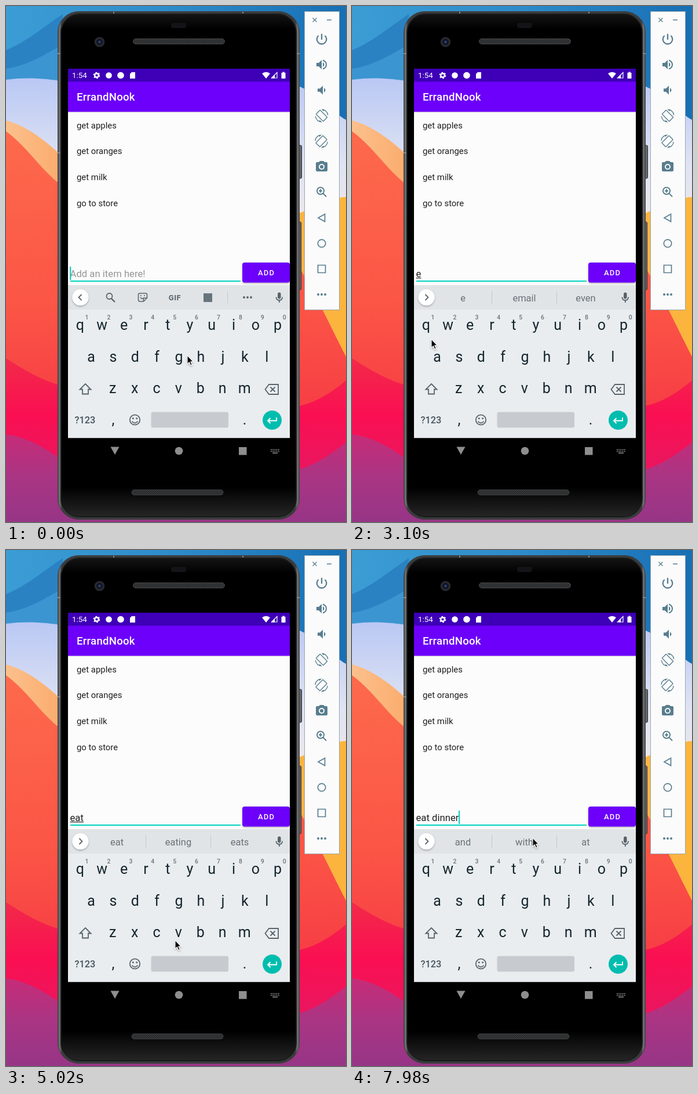
Recreate the animation shown at these times as an HTML page. Size 587x889 px, loop 8000 ms.

```html
<!DOCTYPE html>
<html lang="en">
<head>
<meta charset="utf-8">
<title>To-do list demo</title>
<style>
html, body { margin: 0; width: 100%; height: 100%; overflow: hidden; background: #000; }
svg { display: block; width: 587px; height: 889px; font-family: Roboto, sans-serif; }
text { white-space: pre; }
.mid { text-anchor: middle; }
.key { font-size: 25px; fill: #14252c; text-anchor: middle; }
.num { font-size: 10.5px; fill: #69747a; text-anchor: middle; font-weight: 500; }
.item { font-size: 14.9px; fill: #202020; }
.sug { font-size: 16.5px; fill: #697177; text-anchor: middle; }
.line { fill: none; stroke: #58636a; stroke-width: 1.8; }
.tool { fill: none; stroke: #587d8e; stroke-width: 2; }
.solid { fill: #587d8e; stroke: none; }
</style>
</head>
<body>
<svg id="stage" viewBox="0 0 587 889" xmlns="http://www.w3.org/2000/svg">
<defs>
  <linearGradient id="sky" x1="0" y1="0" x2="1" y2="0"><stop offset="0" stop-color="#3c9dd5"/><stop offset=".5" stop-color="#2d8bca"/><stop offset="1" stop-color="#176fb4"/></linearGradient>
  <linearGradient id="mist" x1="0" y1="0" x2="0" y2="1"><stop offset="0" stop-color="#b9c8f4"/><stop offset=".5" stop-color="#dfe3f3"/><stop offset="1" stop-color="#f3eae6"/></linearGradient>
  <linearGradient id="peach" x1="0" y1="0" x2="1" y2="0"><stop offset="0" stop-color="#fbc08c"/><stop offset=".2" stop-color="#fba765"/><stop offset="1" stop-color="#fbb53c"/></linearGradient>
  <linearGradient id="coral" x1="0" y1="0" x2="0" y2="1"><stop offset="0" stop-color="#fd6a4c"/><stop offset=".6" stop-color="#fb5546"/><stop offset="1" stop-color="#f63a44"/></linearGradient>
  <linearGradient id="rose" x1="0" y1="0" x2="0" y2="1"><stop offset="0" stop-color="#f22a49"/><stop offset=".35" stop-color="#fa0f52"/><stop offset="1" stop-color="#d91d6c"/></linearGradient>
  <linearGradient id="plum" x1="0" y1="0" x2="0" y2="1"><stop offset="0" stop-color="#c62c78"/><stop offset=".5" stop-color="#a93584"/><stop offset="1" stop-color="#973586"/></linearGradient>
  <linearGradient id="rim" x1="0" y1="0" x2="1" y2="0"><stop offset="0" stop-color="#4c4d4e"/><stop offset=".008" stop-color="#727374"/><stop offset=".016" stop-color="#3a3b3c"/><stop offset=".984" stop-color="#3a3b3c"/><stop offset=".992" stop-color="#727374"/><stop offset="1" stop-color="#4c4d4e"/></linearGradient>
  <linearGradient id="body" x1="0" y1="0" x2="0" y2="1"><stop offset="0" stop-color="#141414"/><stop offset=".03" stop-color="#000"/><stop offset=".94" stop-color="#000"/><stop offset="1" stop-color="#262626"/></linearGradient>
  <radialGradient id="lens"><stop offset="0" stop-color="#43599c"/><stop offset=".25" stop-color="#1a2547"/><stop offset=".5" stop-color="#0b0e18"/><stop offset=".7" stop-color="#2b2d31"/><stop offset="1" stop-color="#232427"/></radialGradient>
  <pattern id="mesh" width="4" height="4" patternUnits="userSpaceOnUse"><rect width="4" height="4" fill="#292a2c"/><path d="M0 0L4 4M4 0L0 4" stroke="#3d3e40" stroke-width=".7"/></pattern>
  <filter id="soft" x="-30%" y="-20%" width="160%" height="150%"><feDropShadow dx="0" dy="1.5" stdDeviation="1.5" flood-opacity=".32"/></filter>
  <path id="turn" transform="scale(.95) translate(-12 -12)" fill-rule="evenodd" d="M10.200 1.800Q9.200 .8 8.100 1.800L1.800 8.100Q.8 9.200 1.800 10.200L13.800 22.200Q14.800 23.200 15.900 22.200L22.200 15.900Q23.200 14.800 22.200 13.800ZM14.800 21.200L2.800 9.200L9.200 2.800L21.200 14.800ZM16.500 2.500Q21.800 5 22.500 11H24Q22.500 .5 11.300 0L15.200 3.800ZM7.500 21.500Q2.200 19 1.500 13H0Q1.500 23.500 12.700 24L8.800 20.200Z"/>
</defs>

<!-- wallpaper -->
<rect width="587" height="889" fill="url(#sky)"/>
<path d="M0 76C35 62 62 38 98 14V125H0Z" fill="#2a82c3"/>
<path d="M0 108C40 102 70 82 98 66V130H0Z" fill="#3b95d1"/>
<path d="M0 127C36 122 70 125 100 130L500 136C540 150 565 185 587 196V420H0Z" fill="url(#mist)"/>
<path d="M0 197C36 207 66 230 98 260V420H500V360C540 342 565 330 587 329V640H0Z" fill="url(#peach)"/>
<path d="M0 216C35 240 64 288 98 310L500 440C532 490 562 556 587 604V720H0Z" fill="url(#coral)"/>
<path d="M0 607C30 626 66 648 98 654L500 690C530 686 560 668 587 645V889H0Z" fill="url(#rose)"/>
<path d="M0 738C35 742 66 760 98 784L500 800C535 792 560 772 587 752V889H0Z" fill="url(#plum)"/>

<!-- phone -->
<g fill="#66686a" stroke="#2c2c2c"><rect x="503" y="240" width="7.500" height="57" rx="2"/><rect x="503" y="372" width="6.500" height="117" rx="2"/></g>
<rect x="89.500" y="9.500" width="417" height="875" rx="36" fill="url(#rim)" stroke="#3e3f40"/>
<path d="M89 82H96M500 82H507M89 253H96M186 10V14M409 10V14" stroke="#888" stroke-width="2"/>
<rect x="95" y="14" width="406" height="866" rx="32" fill="url(#body)" stroke="#1a1b1c" stroke-width="2"/>
<rect x="285" y="29" width="26" height="9" rx="4" fill="#131418"/>
<rect x="219.500" y="56.500" width="158" height="9" rx="4.500" fill="url(#mesh)" stroke="#464749"/>
<rect x="217" y="833.500" width="158" height="9" rx="4.500" fill="url(#mesh)" stroke="#3d3e40"/>
<circle cx="161.500" cy="62" r="8.800" fill="url(#lens)"/>

<!-- app -->
<rect x="107" y="108" width="383" height="636" fill="#fcfcfc"/>
<rect x="107" y="108" width="383" height="74.600" fill="#6c00fa"/>
<rect x="107" y="108" width="383" height="22.400" fill="#3e00b7"/>
<path d="M107 183.100H490" stroke="#e2e2e2"/>
<g fill="#fff">
  <text x="114" y="124.300" font-size="13.400">1:54</text>
  <circle cx="156.500" cy="119.500" r="3.300" fill="none" stroke="#fff" stroke-width="2.400"/>
  <circle cx="156.500" cy="119.500" r="4.900" fill="none" stroke="#fff" stroke-width="1.900" stroke-dasharray="2.600 2.530"/>
  <circle cx="177.500" cy="119.500" r="5.300"/>
  <circle cx="198" cy="119.500" r="5.800"/>
  <path d="M217 114H223V125H214V117Z"/>
  <path d="M442 116.300Q449 111 456 116.300L449 125ZM479 125H475.500V115H477.500V113.500H480.500V115H482.500V125Z"/>
  <path d="M458.500 124H468V114.500Z" fill="none" stroke="#fff" stroke-width="1.200"/><path d="M458 124.500L464 118.500V124.500Z"/>
  <text x="122" y="163.300" font-size="18.600" font-weight="500" letter-spacing=".25">ErrandNook</text>
</g>
<g id="items"></g>
<path d="M111 474H405" stroke="#00d3c0" stroke-width="2"/>
<rect x="408" y="442" width="82" height="34.500" rx="4" fill="#6c00fa" filter="url(#soft)"/>
<text x="435" y="464.300" font-size="13" font-weight="500" letter-spacing="1.150" fill="#fff">ADD</text>
<text id="hint" x="110.500" y="466.700" font-size="16.700" fill="#979797">Add an item here!</text>
<text id="field" x="110.500" y="466.700" font-size="16.700" fill="#202020"></text>
<rect id="under" y="468" height="1.200" fill="#202020"/>
<rect id="caret" y="449" width="2" height="23" fill="#00cdbb"/>

<!-- keyboard -->
<rect x="107" y="481" width="383" height="263.300" fill="#e9edf0"/>
<rect x="107" y="481" width="383" height="42" fill="#e0e4e7"/>
<circle cx="128.500" cy="502" r="14" fill="#fff" filter="url(#soft)"/>
<path id="chevron" class="line"/>
<g id="tools">
  <g class="line"><circle cx="178.500" cy="500" r="5"/><path d="M182 504L188 510" stroke-width="2.400"/>
  <path d="M231 495H241Q243.500 495 243.500 497.500V503L237.500 509H231Q228.500 509 228.500 506.500V497.500Q228.500 495 231 495ZM237.500 509V503H243.500M232 502Q234 505 237 504M233 498V500M239 498V500" stroke-width="1.500"/></g>
  <text class="mid" x="291.500" y="506.500" font-size="13" font-weight="700" letter-spacing=".5" fill="#58636a">GIF</text>
  <rect x="341" y="495" width="15" height="15" fill="#68747b"/>
  <path d="M382.500 492V512" stroke="#c5cace"/>
  <g fill="#58636a"><circle cx="411" cy="502" r="1.900"/><circle cx="417" cy="502" r="1.900"/><circle cx="423" cy="502" r="1.900"/></g>
</g>
<g id="words"><path d="M241.500 491V513M353.500 491V513" stroke="#c3c8cc"/><text class="sug" x="191.500" y="508.500"></text><text class="sug" x="297.500" y="508.500"></text><text class="sug" x="403.500" y="508.500"></text></g>
<rect x="469" y="493.500" width="5.500" height="11" rx="2.700" fill="#58636a"/>
<path class="line" d="M466.500 501.500Q466.500 507 471.800 507T477 501.500M471.800 507V511"/>
<g id="keys"></g>
<g class="line">
  <path d="M137 651L146.500 660.500H142V668.500H132V660.500H127.500Z"/>
  <path d="M454 652H470V669H454L447.500 660.500ZM456.500 656.500L464.500 664.500M464.500 656.500L456.500 664.500"/>
  <circle cx="222.500" cy="713" r="8.700"/><path d="M217.500 715.500Q222.500 721.500 227.500 715.500"/>
</g>
<g fill="#58636a"><circle cx="219.300" cy="710.500" r="1.500"/><circle cx="225.700" cy="710.500" r="1.500"/></g>
<text x="118.500" y="719" font-size="16.400" font-weight="500" fill="#46545c">?123</text>
<text class="key" x="185" y="721">,</text><text class="key" x="412" y="721">.</text>
<rect id="space" x="250.500" y="699.500" width="133.500" height="27" rx="3"/>
<circle cx="459.500" cy="713.500" r="16.500" fill="#00bdae"/>
<path d="M467 709V714.500H452.500M456.500 710L452 714.500L456.500 719" fill="none" stroke="#fff" stroke-width="1.900"/>
<g fill="#8e8e8e">
  <path d="M180.500 759.500H195.500L188 773Z"/><circle cx="298.500" cy="766.500" r="6.800"/><rect x="402" y="760" width="13.500" height="13.500"/>
  <path d="M457 764.300H472M457 767.300H472" stroke="#8e8e8e" stroke-width="1.800" stroke-dasharray="1.800 1.400"/><path d="M460 769.500H469V771H460Z"/>
</g>
<g id="popup"><rect x="-19.300" y="-96" width="38.500" height="111" rx="4" fill="#d9dbdc" filter="url(#soft)"/><text class="key" y="-59.500" style="fill:#4d5357"></text><text class="mid" x="10.500" y="-48" font-size="13" fill="#4d5357">…</text></g>

<!-- emulator controls -->
<rect x="515.500" y="9.500" width="60" height="514" fill="#fbfbfb" stroke="#9aa7b0"/>
<g class="tool">
  <path d="M529.500 20.500L536.500 27.500M536.500 20.500L529.500 27.500M554 24H562" stroke-width="1.400"/>
  <path d="M539.500 51A8.300 8.300 0 1 0 550.500 51M545 48V58" stroke-width="2.300"/>
  <circle cx="543" cy="318.500" r="6"/><path d="M547.500 323L553 328.500M540 318.500H546M543 315.500V321.500"/>
  <path d="M550.500 358.500V371.500L539 365ZM538.500 446.500H551.500V459.500H538.500Z" stroke-width="1.700"/>
  <circle cx="545" cy="409" r="6.700" stroke-width="1.700"/>
</g>
<g class="solid">
  <path d="M536 98H540L545 93V109L540 104H536ZM547 97Q549.500 98.300 549.500 101T547 105ZM547 92.500Q554 94.500 554 101T547 109.500V107.500Q552 105.500 552 101T547 94.500Z"/>
  <path d="M538 142.300H542L547 137.300V152.700L542 147.700H538ZM549 141.300Q551.500 142.600 551.500 145T549 149Z"/>
  <use href="#turn" x="0" y="0" transform="translate(545 189)"/>
  <use href="#turn" x="0" y="0" transform="translate(544.500 233) scale(-1 1)"/>
  <path fill-rule="evenodd" d="M537 269H540L542 267H548L550 269H553Q555 269 555 271V283Q555 285 553 285H537Q535 285 535 283V271Q535 269 537 269ZM545 272A5 5 0 1 0 545 282A5 5 0 1 0 545 272Z"/>
  <circle cx="545" cy="277" r="3.100"/><circle cx="539" cy="497" r="2"/><circle cx="545" cy="497" r="2"/><circle cx="551" cy="497" r="2"/>
</g>

<path id="mouse" d="M0 0V14.800L3.400 11.700L5.800 17.200L8.200 16.200L5.900 10.800H10.400Z" fill="#000" stroke="#fff" stroke-width="1.100" filter="url(#soft)"/>
</svg>
<script>
const LOOP = 8000, STEP = 147.8, LEFT = 110.5;
const $ = id => document.getElementById(id);
const show = (el, on) => el.setAttribute('visibility', on ? 'visible' : 'hidden');
const move = (el, x, y) => el.setAttribute('transform', `translate(${x} ${y})`);

function label(parent, cls, x, y, str) {
  const el = document.createElementNS('http://www.w3.org/2000/svg', 'text');
  el.setAttribute('class', cls);
  el.setAttribute('x', x);
  el.setAttribute('y', y);
  el.textContent = str;
  parent.append(el);
}

['get apples', 'get oranges', 'get milk', 'go to store']
  .forEach((s, i) => label($('items'), 'item', 122, 210.7 + i * 44.7, s));

const keyAt = {};
[['qwertyuiop', 127.8, 558], ['asdfghjkl', 147, 612.5], ['zxcvbnm', 184.2, 667]].forEach(([row, x0, y], r) => {
  [...row].forEach((c, i) => {
    const x = x0 + i * 37.9;
    keyAt[c] = [x, y];
    label($('keys'), 'key', x, y, c);
    if (!r) label($('keys'), 'num', x + 11.8, 539.5, (i + 1) % 10);
  });
});

// pointer: step, x, y
const path = [
  [0, 313, 602], [1, 313, 602], [3, 302, 598], [6, 272, 579], [7, 272, 579], [9, 252, 569],
  [12, 214, 552], [13, 214, 552], [14, 209, 545], [16, 208, 545], [19, 148, 566], [20, 148, 566],
  [21, 137, 574], [23, 145, 605], [25, 146, 606], [27, 222, 570], [29, 272, 546], [31, 274, 550],
  [35, 298, 713], [37, 296, 710], [38, 255, 645], [39, 255, 645], [40, 232, 615], [41, 219, 600],
  [43, 221, 599], [46, 420, 534], [47, 408, 538], [51, 318, 501], [54, 312, 496]
];

// field: step, finished text, underlined text, suggestions, caret start
const states = [
  [0, '', '', '', -210],
  [16, '', 'e', 'e email even', 2300],
  [25, '', 'ea', 'ea early eat', 3600],
  [30, '', 'eat', 'eat eating eats', 4400],
  [37, 'eat ', '', 'it and at', 5420],
  [43, 'eat ', 'd', 'd dinner drink', 6250],
  [52, 'eat dinner', '', 'and with at', 7600]
];
const presses = { 15: 'e', 24: 'a', 29: 't', 42: 'd' };

function pointer(k) {
  const i = Math.max(1, path.findIndex(p => p[0] >= k));
  const [a, x, y] = path[i - 1], [b, u, v] = path[i];
  const f = (k - a) / (b - a);
  return [x + (u - x) * f, y + (v - y) * f];
}

function drawField(done, word, caretOn) {
  const field = $('field'), typed = done + word !== '';
  field.textContent = done + word;
  const full = typed ? field.getComputedTextLength() : 0;
  const start = done && word ? field.getSubStringLength(0, done.length) : 0;
  $('under').setAttribute('x', LEFT + start);
  $('under').setAttribute('width', full - start);
  show($('under'), word !== '');
  $('caret').setAttribute('x', LEFT - 0.3 + full);
  show($('caret'), caretOn);
  show($('hint'), !typed);
}

function draw(t) {
  const k = Math.min(54, Math.floor((t + 10) / STEP));
  const [, done, word, sug, since] = states.filter(s => s[0] <= k).pop();
  drawField(done, word, (k * STEP - since) % 1000 < 500);

  const parts = sug.split(' ');
  show($('tools'), !sug);
  show($('words'), sug);
  $('words').querySelectorAll('text').forEach((el, i) => el.textContent = parts[i] || '');
  $('chevron').setAttribute('d', sug ? 'M126.500 497L131.500 502L126.500 507' : 'M130.500 497L125.500 502L130.500 507');

  const key = presses[k];
  show($('popup'), key);
  if (key) {
    move($('popup'), ...keyAt[key]);
    $('popup').querySelector('text').textContent = key;
  }
  $('space').setAttribute('fill', k === 36 ? '#b9bec3' : '#c7cbd0');
  move($('mouse'), ...pointer(k));
}

function tick() {
  draw(performance.now() % LOOP);
  requestAnimationFrame(tick);
}
tick();
</script>
</body>
</html>
```
